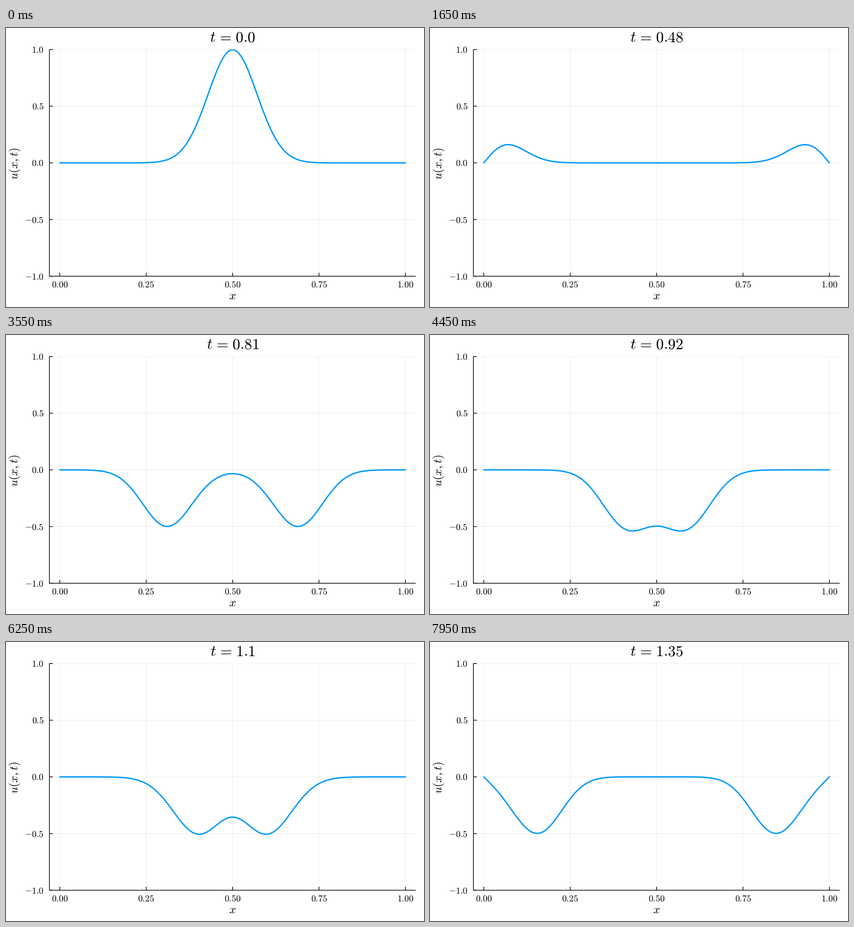
Write a matplotlib script that moves like this. It is 917x611 px and loops after 8 s.

```python
import numpy as np
import matplotlib.pyplot as plt
from matplotlib.animation import FuncAnimation
from matplotlib.patches import Rectangle

W, H, DPI = 917, 611, 64
FRAMES, INTERVAL = 160, 50
LEFT, RIGHT, TOP, BOTTOM = 95.3, 898.8, 47.2, 543.6
X0, X1 = 118.0, 876.2
BLUE = "#009afa"

plt.rcParams["mathtext.fontset"] = "cm"
plt.rcParams["text.hinting"] = "none"


def pt(px):
    return px * 72 / DPI


def sx(x):
    return X0 + (X1 - X0) * x


def sy(u):
    return (TOP + BOTTOM) / 2 - (BOTTOM - TOP) / 2 * u


# Wave equation on a uniform grid with fixed ends, solved by sine modes
N = 100
x = np.linspace(0, 1, N)
k = np.arange(1, N - 1)
modes = np.sin(np.pi * np.outer(x, k))
coef = 2 / (N - 1) * modes.T @ np.exp(-100 * (x - 0.5) ** 2)
omega = 2 * (N - 1) * np.sin(np.pi * k / (2 * (N - 1)))


def wave(t):
    return modes @ (coef * np.cos(omega * t))


# Uneven solver time steps: a smooth curve through a few known times
STEP = np.array([0, 17, 34, 49, 71, 85, 102, 110, 119, 138, 159])
TIME = np.array([0, 0.331, 0.49, 0.612, 0.813, 0.896, 0.983, 1.0252,
                 1.071, 1.18, 1.349])
RATE = np.gradient(TIME, STEP)


def time_at(i):
    j = min(np.searchsorted(STEP, i, side="right") - 1, len(STEP) - 2)
    h = STEP[j + 1] - STEP[j]
    s = (i - STEP[j]) / h
    return float(TIME[j] + (TIME[j + 1] - TIME[j]) * s * s * (3 - 2 * s)
                 + h * s * (1 - s) * (RATE[j] * (1 - s) - RATE[j + 1] * s))


fig = plt.figure(figsize=(W / DPI, H / DPI), dpi=DPI, facecolor="white")
ax = fig.add_axes([0, 0, 1, 1])
ax.set_xlim(0, W)
ax.set_ylim(H, 0)
ax.axis("off")
area = Rectangle((LEFT, TOP), RIGHT - LEFT, BOTTOM - TOP,
                 transform=ax.transData)


def line(xs, ys, width, color="black", clip=False, **kw):
    item, = ax.plot(xs, ys, color=color, lw=pt(width), snap=False, **kw)
    if clip:
        item.set_clip_path(area)
    return item


def label(px, py, text, size, ha="center", **kw):
    return ax.text(px, py, text, fontsize=pt(size), ha=ha, va="baseline", **kw)


for v in (0, 0.25, 0.5, 0.75, 1):
    px = sx(v)
    line([px, px], [TOP, BOTTOM], 0.8, alpha=0.1, clip=True, zorder=1)
    line([px, px], [BOTTOM, BOTTOM - 7.6], 1.5, zorder=4,
         solid_capstyle="butt")
    label(px, 568, f"${v:.2f}$", 19.8)

for v in (-1, -0.5, 0, 0.5, 1):
    py = sy(v)
    line([LEFT, RIGHT], [py, py], 0.8, alpha=0.1, clip=True, zorder=1)
    line([LEFT, LEFT + 7.6], [py, py], 1.5, zorder=4, solid_capstyle="butt")
    label(82.8, py + 6.6, f"${v:.1f}$", 19.8, ha="right")

line([LEFT, LEFT, RIGHT], [TOP - 0.7, BOTTOM, BOTTOM], 1.5, zorder=4,
     solid_capstyle="butt", solid_joinstyle="miter")
label(497, 594, "$x$", 26)
label(25.7, 296.5, "$u(x,t)$", 26, rotation=90, rotation_mode="anchor")

title = label(497.5, 31, "", 33.5)
curve = line(sx(x), sy(0 * x), 3, BLUE, clip=True, zorder=3,
             solid_capstyle="round", solid_joinstyle="round")


def draw(i):
    t = time_at(i)
    curve.set_ydata(sy(wave(t)))
    title.set_text(rf"$t\hspace{{0.116}}=\hspace{{0.116}}{round(t, 2)}$")
    return curve, title


anim = FuncAnimation(fig, draw, frames=FRAMES, interval=INTERVAL,
                     init_func=lambda: draw(0), repeat=True, repeat_delay=0)
plt.show()
```
